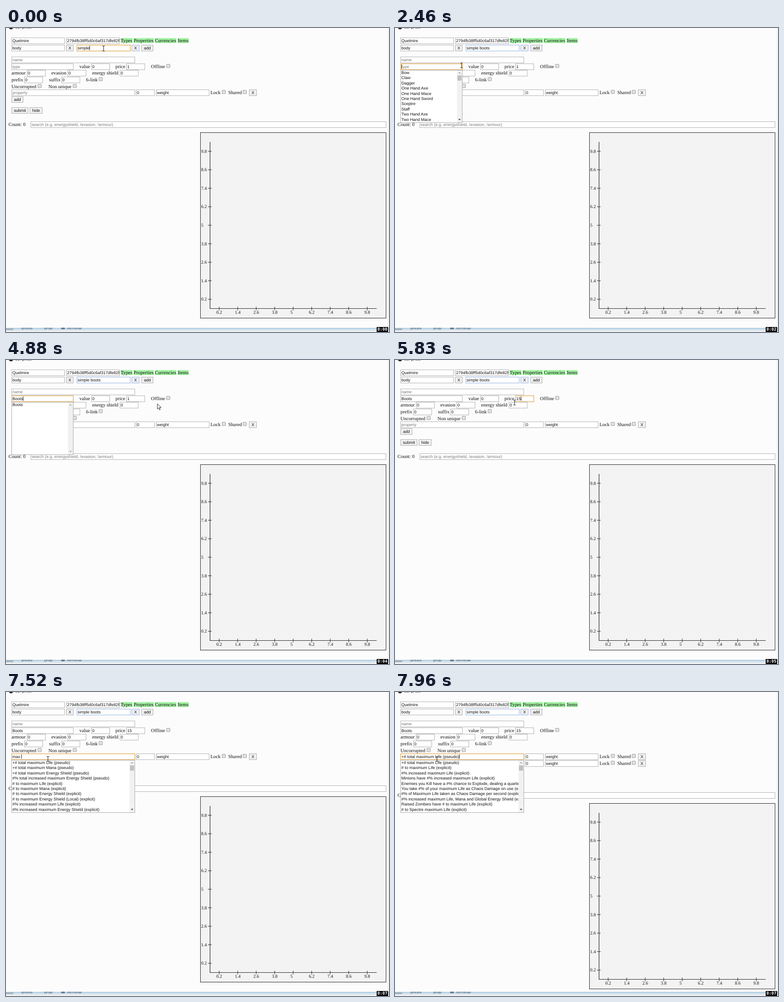
An HTML page that plays this animation: 840x667 px, repeating every 8000 ms.

```html
<!DOCTYPE html>
<html lang="en">
<head>
<meta charset="utf-8">
<title>Item pricing form</title>
<style>
  html, body { margin: 0; width: 840px; height: 667px; overflow: hidden; background: #fcfcfc; }
  svg { display: block; text-rendering: geometricPrecision; }
  text { white-space: pre; }
  .ui { font: 9.03px "Liberation Sans", Arial, sans-serif; fill: #111; }
  .hint { fill: #777; }
  .label { font: 10.75px "Liberation Serif", "Times New Roman", serif; fill: #111; }
  .axis { font-size: 10px; }
  .task { fill: #456; }
  .clock { font: bold 9px "DejaVu Sans Mono", monospace; fill: #fff; }
</style>
</head>
<body>
<svg id="stage" width="840" height="667" viewBox="0 0 840 667"></svg>
<script>
const LOOP = 8000;
const SCALE = 9.03 / 90;
const stage = document.getElementById('stage');
const pen = document.createElement('canvas').getContext('2d');
pen.font = '90px "Liberation Sans", Arial, sans-serif';
const textWidth = s => pen.measureText(s).width * SCALE;

// Each entry holds from its time until the next one.
const at = (keys, t) => keys.filter(k => k[0] <= t).pop()[1];

const ALIAS = [[0, 'simple'], [100, 'simple '], [170, 'simple b'], [240, 'simple bo'],
  [380, 'simple boo'], [450, 'simple boot'], [530, 'simple boots']];
const TYPE = [[0, ''], [2980, 'b'], [3130, 'bo'], [3290, 'boo'], [3850, 'Boots']];
const PRICE = [[0, '1'], [5540, '15']];
const PROPERTY = [[0, ''], [7110, 'm'], [7220, 'ma'], [7340, 'max'], [7520, 'max '],
  [7600, 'max l'], [7760, 'max li'], [7860, 'max lif'], [7960, '+# total maximum Life (pseudo)']];
const FOCUS = [[0, 'alias'], [870, 'remove'], [2460, 'type'], [5330, 'price'], [6470, 'property']];
const CLOCK = [[0, 0], [990, 1], [1990, 2], [2960, 3], [3980, 4], [4980, 5], [5980, 6], [7110, 7]];

const TYPES = ['Bow', 'Claw', 'Dagger', 'One Hand Axe', 'One Hand Mace', 'One Hand Sword',
  'Sceptre', 'Staff', 'Two Hand Axe', 'Two Hand Mace'];
const PSEUDO = ['+#% total to Cold Resistance', '+#% total to Fire Resistance',
  '+#% total to Lightning Resistance', '+#% total Elemental Resistance',
  '+#% total to Chaos Resistance', '+#% total Resistance', '# total Resistances',
  '# total Elemental Resistances', '+#% total to all Elemental Resistances',
  '+# total to Strength'].map(s => s + ' (pseudo)');
const MAXIMUM = ['+# total maximum Life (pseudo)', '+# total maximum Mana (pseudo)',
  '+# total maximum Energy Shield (pseudo)', '#% total increased maximum Energy Shield (pseudo)',
  '# to maximum Life (explicit)', '# to maximum Mana (explicit)',
  '# to maximum Energy Shield (explicit)', '# to maximum Energy Shield (Local) (explicit)',
  '#% increased maximum Life (explicit)', '#% increased maximum Energy Shield (explicit)'];
const LIFE = ['+# total maximum Life (pseudo)', '# to maximum Life (explicit)',
  '#% increased maximum Life (explicit)', 'Minions have #% increased maximum Life (explicit)',
  'Enemies you Kill have a #% chance to Explode, dealing a quarter of',
  'You take #% of your maximum Life as Chaos Damage on use (explicit)',
  '#% of Maximum Life taken as Chaos Damage per second (explicit)',
  '#% increased maximum Life, Mana and Global Energy Shield (explicit)',
  'Raised Zombies have # to maximum Life (explicit)', '# to Spectre maximum Life (explicit)'];
const TYPE_LIST = [[2460, TYPES], [2980, ['Bow', 'Body Armour', 'Boots', 'Belt']],
  [3130, ['Bow', 'Body Armour', 'Boots']], [3290, ['Boots']]];
const PROPERTY_LIST = [[6470, PSEUDO],
  [7110, PSEUDO.filter(s => s.includes('m')).concat(MAXIMUM).slice(0, 10)],
  [7220, MAXIMUM], [7600, LIFE]];

// Pointer stops: time, x, y
const PATH = [[0, 214, 45], [1620, 214, 45], [1670, 202, 45], [2210, 146, 82], [4650, 146, 82],
  [4880, 332, 96], [5130, 285, 86], [5700, 285, 86], [6310, 92, 147], [LOOP, 92, 147]];

function pointerAt(t) {
  const i = PATH.findIndex(p => p[0] > t);
  const [a, b] = [PATH[i - 1], PATH[i]];
  const u = (t - a[0]) / (b[0] - a[0]);
  const k = u * u * (3 - 2 * u);
  return [a[1] + (b[1] - a[1]) * k, a[2] + (b[2] - a[2]) * k];
}

const esc = s => String(s).replace(/&/g, '&amp;').replace(/</g, '&lt;');
const text = (x, y, s, cls = 'ui') => `<text x="${x}" y="${y}" class="${cls}">${esc(s)}</text>`;
const rect = (x, y, w, h, fill, stroke = 'none', sw = 1, rx = 0) =>
  `<rect x="${x}" y="${y}" width="${w}" height="${h}" fill="${fill}" stroke="${stroke}" stroke-width="${sw}" rx="${rx}"/>`;
const path = (d, stroke, sw = 1, fill = 'none') =>
  `<path d="${d}" stroke="${stroke}" stroke-width="${sw}" fill="${fill}"/>`;
const label = (x, y, s) => text(x, y, s, 'label');
const check = (x, y) => rect(x + .5, y + .5, 7.5, 7.5, '#e2e2e2', '#999', 1, 1);
const button = (x, y, w, s, ring) =>
  rect(x + .5, y + .5, w - 1, 13, '#f1f1f1', ring || '#adadad', ring ? 1.5 : 1) +
  text(x + (w - textWidth(s)) / 2, y + 9.8, s);
const link = (x, w, s) => rect(x, 22, w, 11, '#a5f3a5') + label(x, 30.5, s);

const ORANGE = '#e6b35f', BLUE = '#b3c8ec';

function list(x, y, w, items, scrolls) {
  const bar = x + w - 12, mid = bar + 5.5;
  const arrow = (cy, dir, color) =>
    path(`M${mid - 2.8} ${cy - dir * 1.5}h5.6l-2.8 ${dir * 3}z`, 'none', 0, color);
  const rows = items.map((s, i) => text(x + 2, y + 8.7 + i * 11.45, s)).join('');
  return rect(x + .5, y + .5, w - 1, 115, '#fff', '#aaa') +
    `<clipPath id="rows"><rect x="${x}" y="${y}" width="${w - 12}" height="115"/></clipPath>` +
    `<g clip-path="url(#rows)">${rows}</g>` +
    rect(bar, y + 1, 11, 114, '#f1f1f1') +
    arrow(y + 6, -1, '#a3a3a3') + arrow(y + 109, 1, scrolls ? '#444' : '#a3a3a3') +
    (scrolls ? rect(bar + 1, y + 12, 9, 11.5, '#c1c1c1') : '');
}

function chart() {
  let out = rect(426.5, 229.5, 407, 407, '#f3f3f3', '#222') +
    path('M447.5 250V615.5H813', '#222', 1.2);
  for (let i = 0; i < 9; i++) {
    const value = +(0.2 + i * 1.2).toFixed(1);
    const x = 467.5 + i * 40.6, y = 595.2 - i * 40.6;
    out += path(`M443 ${y}h8M${x} 611.5v8`, '#222') +
      text(428, y + 3.2, value, 'label axis') + text(x - 6.2, 627.3, value, 'label axis');
  }
  return out;
}

function pointer([x, y], overField) {
  if (overField) {
    return path(`M${x - 2.5} ${y - 5.5}h2l.5 .7l.5-.7h2M${x} ${y - 5}v10M${x - 2.5} ${y + 5.5}h2l.5-.7l.5 .7h2`, '#111');
  }
  return path(`M${x} ${y}v11.5l2.7-2.5l2 4.5l1.8-.8l-2-4.4h3.7z`, '#111', .9, '#fff');
}

function taskbar() {
  return rect(0, 658, 840, 6, '#d3e2ec') + rect(0, 658, 840, 1.5, '#9cc3dc') +
    rect(0, 664, 840, 3, '#f0f1f2') + rect(0, 659, 16, 4, '#a9b4bd') +
    '<clipPath id="bar"><path d="M0 657.5H813V662.5H0z"/></clipPath><g clip-path="url(#bar)">' +
    text(34, 660.5, 'prices', 'ui task') + text(84, 660.5, 'prop', 'ui task') +
    rect(121, 657, 8, 4, '#678') + text(132, 660.5, 'Terminal', 'ui task') + '</g>';
}

function draw(t) {
  const focus = at(FOCUS, t);
  const extra = t >= 7960;
  const drop = extra ? 15 : 0;
  const fields = [];
  const field = (x, y, w, value, hint, id) => {
    const active = id && id === focus;
    const ring = active ? ORANGE : id === 'alias' ? BLUE : '#b0b0b0';
    fields.push([x, y, w]);
    const caretOn = active && !(t >= 4340 && t < 4840);
    const cx = x + 2 + textWidth(value);
    return rect(x + .5, y + .5, w - 1, 13, '#fff', ring, active || id === 'alias' ? 1.5 : 1) +
      (value ? text(x + 2, y + 9.6, value) : text(x + 2, y + 9.6, hint, 'ui hint')) +
      (caretOn ? path(`M${cx + .5} ${y + 2}v9.5`, '#111') : '');
  };
  const propertyRow = (y, value, id) =>
    field(12, y, 271, value, 'property', id) + field(285, y, 41, '0') + field(329, y, 117, 'weight') +
    label(448.5, y + 9.6, 'Lock') + check(473.5, y + 1) +
    label(487.5, y + 9.6, 'Shared') + check(519.5, y + 1) + button(533, y, 17, 'X');

  let out = rect(0, 0, 840, 667, '#fcfcfc') + path('M838.5 0V657', '#e6e6e6') +
    '<circle cx="11" cy="-2" r="5" fill="#222"/>' + text(20, 1, 'our pricer');

  out += field(12, 21, 117, 'Quelmire') + field(132, 21, 117, '2794fb38ff5d0c6af317dfe82f') +
    link(251.5, 26, 'Types') + link(280, 44, 'Properties') +
    link(326.5, 47, 'Currencies') + link(376.5, 24, 'Items') +
    field(12, 37, 117, 'body') + button(132, 37, 16, 'X') +
    field(155, 37, 118, at(ALIAS, t), '', 'alias') +
    button(275.5, 37, 17, 'X', focus === 'remove' ? ORANGE : BLUE) + button(297, 37, 26, 'add');

  out += field(12, 63, 271, '', 'name') +
    field(12, 78, 136, at(TYPE, t), 'type', 'type') +
    label(161, 87.8, 'value') + field(187, 78, 41, '0') +
    label(240, 87.8, 'price') + field(264, 78, 41, at(PRICE, t), '', 'price') +
    label(318, 87.8, 'Offline') + check(351.5, 79) +
    label(12, 102.3, 'armour') + field(46, 92, 41, '0') +
    label(99.5, 102.3, 'evasion') + field(135, 92, 41, '0') +
    label(189, 102.3, 'energy shield') + field(249.5, 92, 41, '0') +
    label(12, 117, 'prefix') + field(40, 107, 41, '0') +
    label(94.5, 117, 'suffix') + field(121.5, 107, 41, '0') +
    label(175.5, 117, '6-link') + check(203.5, 108) +
    label(12, 131.5, 'Uncorrupted') + check(69.5, 123) +
    label(93, 131.5, 'Non unique') + check(146.5, 123) +
    propertyRow(135, at(PROPERTY, t), 'property') +
    (extra ? propertyRow(150, '') : '');

  out += `<g transform="translate(0 ${drop})">` +
    button(12, 150, 26, 'add') + button(12, 174, 37, 'submit') + button(52, 174, 28, 'hide') +
    label(5.5, 215, 'Count: 0') +
    field(54, 205, 780, '', 'search (e.g. energyshield, !evasion, !armour)') + chart() + '</g>';

  if (focus === 'type') out += list(12, 92, 136, at(TYPE_LIST, t), t < 2980);
  if (focus === 'property') out += list(12, 149, 271, at(PROPERTY_LIST, t), true);

  out += taskbar() + rect(813, 656, 25, 11, '#000') +
    text(814.7, 664.3, '0:0' + at(CLOCK, t), 'clock');

  const [px, py] = pointerAt(t);
  const over = fields.some(([x, y, w]) => px >= x && px <= x + w && py >= y && py <= y + 14);
  return out + pointer([px, py], over);
}

let last = '';
const start = performance.now();
function frame() {
  const next = draw((performance.now() - start) % LOOP);
  if (next !== last) stage.innerHTML = last = next;
  requestAnimationFrame(frame);
}
frame();
</script>
</body>
</html>
```
